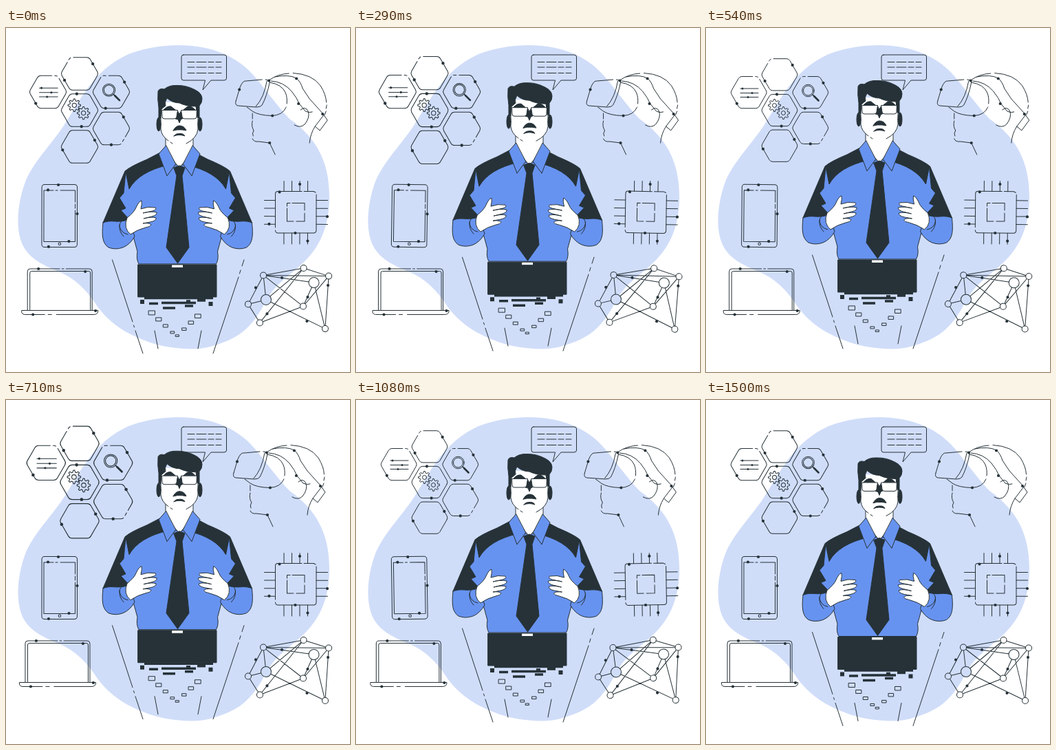
These frames come from a looping animation (500x500 px, 1.54 s). An HTML page:

```html
<!DOCTYPE html>
<html lang="en">
<head>
<meta charset="utf-8">
<style>
  html, body { margin: 0; height: 100%; overflow: hidden; background: #fff; }
  svg { display: block; width: 100vw; height: 100vh; }
  .line { fill: none; stroke: #263238; stroke-width: 1; stroke-linecap: round; stroke-linejoin: round; }
  .dark { fill: #263238; }
  .blue { fill: #6793f0; }
  .pale { fill: #d0ddf9; }
  .white { fill: #fff; }
  .dot { stroke-width: 4.2; }
  .bar { stroke-width: 3.5; stroke-linecap: butt; }
</style>
</head>
<body>
<svg viewBox="0 0 500 500">
  <path class="pale" d="M178 38C205 28 230 25 250 25C300 25 337 42 361 70C378 90 393 112 412 132C452 160 470 195 470 246C470 285 458 318 430 343C410 362 390 372 375 402C356 438 335 452 304 461C284 468 262 468 232 463C190 454 155 435 133 405C122 388 108 370 85 358C62 347 36 340 24 315C13 290 17 252 29 221C43 190 70 165 87 137C108 105 126 62 178 38Z"/>

  <g class="line">
    <path d="M258 39H317Q320.500 39 320.500 42V73Q320.500 76 317 76H298L286 90L289.500 76H258Q255 76 255 73V42Q255 39 258 39Z"/>
    <path d="M264 49.500H313M264 57H313M264 65.500H313" stroke-dasharray="10 3 14 3 8 3"/>
  </g>

  <g id="hexes" class="line">
    <path d="M50 88H76M50 94.500H76M50 100.500H76"/>
    <path d="M53 88h0M67 94.500h0M61 100.500h0" stroke-width="3"/>
    <circle cx="148.500" cy="91" r="8.800"/><circle cx="148.500" cy="91" r="7"/>
    <path d="M155 97l2 2" stroke-width="1.500"/><path d="M157 99l6.500 6.500" stroke-width="2.600"/>
  </g>

  <g id="headset" class="line">
    <path d="M334 106L340 86Q344 76 349 77L372 75M377 75Q382 75 383 79Q379 99 372 112Q370 115 364 115L337 113Q332 112 334 106M379 77Q375 101 363 114"/>
    <path d="M383 79Q401 82 406 94Q409 101 408 110M407 115Q402 127 386 127.500Q367 127 358 121L350 115"/>
    <path d="M382 76Q394 67 411 66M417 65.500Q445 67 457 84Q465 97 465.500 108M466 112L465 117M465 121L463 126"/>
    <path d="M385 77Q403 78 415 92Q423 102 426 110L435 121Q441 124 445 122M391 71Q411 67 422 73Q428 78 431 88L441 103L460 124L467 134L456 149L449 143L462 126"/>
    <path d="M428 119Q435 113 439 121Q442 130 434 140Q428 146 419 141M449 143Q442 154 441 167"/>
    <path d="M358 124V132M358 135Q356 143 360 149Q357 153 359 157M358 161Q360 166 367 165L383 167L391 184"/>
    <path class="dot" d="M339 89.500h0M382 76.500h0M422 73.500h0M425 110h0M387 127.500h0M460 125h0M383 167h0"/>
  </g>

  <g id="tablet" class="line">
    <rect x="52" y="227.500" width="51.500" height="91" rx="4"/>
    <path d="M55 310.500V236H69M72 236h3M79 236H100.500V253M100.500 256v6M100.500 265V310.500H55"/>
    <circle cx="78" cy="313.800" r="1.800"/>
    <path class="dot" d="M76 228h0M61 235.500h0M103.500 270h0M91.500 310h0M62 318h0"/>
  </g>

  <g id="chip" class="line">
    <path d="M430 237.500H395Q391.500 237.500 391.500 241V290M391.500 294Q392 298 395 298H447Q451 298 451 294V242M450 239L447 237.500H433"/>
    <path d="M416 254.500H434V265M434 269V281H422M418 281H408.500V262M408.500 259V254.500H413"/>
    <path class="dot" d="M397.500 238.500h0M427 227h0M467 274h0M382.500 285h0M420.500 298h0M438.500 309.500h0"/>
  </g>

  <g id="laptop" class="line">
    <path d="M31 410V354Q31 350 35 350H78M81 350h3M87 350H121Q125 350 125 354V410"/>
    <path d="M34.500 409.500V356Q34.500 353.500 37 353.500H120Q122.500 353.500 122.500 356V409.500"/>
    <path d="M56 416.500H27Q22.500 416 22.500 412V410.500H133.500V412Q133 416 128 416.500H73M61 416.500h5"/>
    <path class="dot" d="M47 350h0M115 354h0M130 411h0M39 416.500h0"/>
  </g>

  <g id="network" class="line"></g>

  <g id="person" class="line">
    <path d="M154.500 337L184 427M185.500 432l1 3M188 440L199 473M346 337L343 346M341 352L339.500 357M338 362L301 473M216 440L221 466M284 440L279 466"/>
    <path class="bar" d="M201 392.500H301M208 400.500h13m5-1h50M228 407h18M260 404h12m6-8h12M262 397h6"/>
    <path class="bar" d="M195 398h6M294.500 401h6" style="stroke-width:6"/>
    <path id="bits"/>

    <g id="half">
      <path class="dark" d="M250 215L228 179L205 191Q181 201 173 208L141 283L190 290H250Z"/>
      <path class="blue" d="M250 343H193Q189 336 191 325L178 277L167 265L174 262L165 247L171 240L174 209L179 234Q193 209 236 199H250"/>
    </g>
    <use href="#half" transform="matrix(-1 0 0 1 498.500 0)"/>
    <path class="white" d="M232 160V180L252 203L272 180V160Z"/>
    <path class="dark" d="M192 344H306V391H192Z"/>
    <path class="white" d="M241 344H257.500V348.500H241Z"/>
    <path class="dark" d="M244 203L252 200L260 203L256 215L266 319L249.500 342L233 319L248 215Z"/>

    <g id="arm">
      <path class="blue" d="M141 283C139 302 140 313 149 319Q159 323 170 319Q180 315 187 303L179 278Q170 282 158 281Q148 280 141 283Z"/>
      <path d="M176 277Q165 279 165 288Q167 298 177 300M165 286Q164 296 171 303"/>
      <path class="white" d="M176 276Q187 267 189 261Q193 252 197 251Q198 255 196 263Q206 259 217 261Q220 264 213 266L199 269Q211 266 219 268Q220 272 212 274L200 277Q212 274 218 276Q219 280 210 282L199 284Q209 283 211 286Q210 289 203 290Q191 293 181 300Q170 291 176 276Z"/>
    </g>
    <use href="#arm" transform="matrix(-1 0 0 1 498.500 0)"/>

    <path class="white" stroke="none" d="M225 108H279V147Q278 158 266 166L252 169L238 165Q226 158 225 147Z"/>
    <path d="M225 130V147Q226 157 236 164M239 166L242 168M262 168Q278 160 279 147V130"/>
    <path class="dark" d="M222 131V116Q220 104 221 92Q223 87 230 89Q237 83 248 83.500Q262 83 275 90Q285 95 285 103Q285 109 281 113L281 131L278 130L276 114Q262 114 252 109Q242 109 234 102Q230 108 232 113L226 118L225 131Z"/>
    <path class="dark" d="M249 120L246 132L250 133L252 138L254 133L258 131L255 120L252 125Z"/>
    <g id="side">
      <path class="blue" d="M232.500 171L222 183L234 215L246.500 198Z"/>
      <ellipse class="dark" cx="222" cy="140" rx="3" ry="10"/>
      <path class="dark" d="M229 119Q234 113 240 114L246 119Z"/>
      <path class="white" d="M227 119.500H249.500L248 129Q248 132 244 132H230Q227 132 227 129Z"/>
    </g>
    <use href="#side" transform="matrix(-1 0 0 1 504 0)"/>
    <path class="dark" d="M243 149Q247 142 252 142Q259 142 262 149L256 148H249ZM244 157Q247 153 252 153.500Q258 153 260 157Q252 154 244 157Z"/>
  </g>
</svg>

<script>
const LOOP = 1540, LEAD = 40;
const el = id => document.getElementById(id);
const add = (id, html) => el(id).insertAdjacentHTML('beforeend', html);
const polar = (x, y, r, a) => [x + r * Math.cos(a), y + r * Math.sin(a)];
const RAD = Math.PI / 180;

// Rounded hexagon whose sides each count 10 units; the gap and the dots sit at such units.
function hexagon(x, y, gap, ...dots) {
  const corner = i => polar(x, y, 26.7, i * 60 * RAD);
  const at = u => {
    const i = Math.floor(u / 10), k = u / 10 - i, [a, b] = [corner(i), corner(i + 1)];
    return [a[0] + (b[0] - a[0]) * k, a[1] + (b[1] - a[1]) * k];
  };
  let d = `M${at(1.2)}`;
  for (let i = 1; i <= 6; i++) d += `L${at(i * 10 - 1.2)}Q${corner(i)} ${at(i * 10 + 1.2)}`;
  add('hexes', `<path d="${d}Z" pathLength="60" stroke-dasharray="${gap} 1.5 1.5 1.5 60"/>
    <path class="dot" d="${dots.map(u => `M${at(u)}h0`).join('')}"/>`);
}

function gear(x, y) {
  const rim = Array.from({ length: 32 }, (_, i) => polar(x, y, i % 4 < 2 ? 9 : 6.4, (i - .5) * Math.PI / 16));
  add('hexes', `<path d="M${rim.join('L')}Z"/><circle cx="${x}" cy="${y}" r="3"/>`);
}

// Honeycomb: one cell in the middle, five of its six neighbours around it.
hexagon(107, 119.5, 60, 14, 43.5);
[[46, 23], [36, 26, 54], [38, 18, 54], [4, 15, 53], [60, 28, 56]].forEach((marks, i) =>
  hexagon(...polar(107, 119.5, 51.7, (i * 60 - 150) * RAD), ...marks));
gear(99.5, 112.5);
gear(112.5, 123.5);

for (let i = 0; i < 4; i++) {
  const x = 404 + i * 11.5, y = 250.5 + i * 11.6;
  add('chip', `<path d="M${x} 222.500V237.500M${x} 298V314M375.500 ${y}H391.500M451 ${y}H467.500"/>`);
}

const nodes = {
  A: [374, 359.5], B: [432.5, 349], C: [469, 360.5], D: [447.5, 370], E: [378, 395],
  F: [352, 401.5], G: [432, 404.5], H: [369, 428.5], I: [464, 437]
};
const links = 'AB AC AD AG AF AE BE BH BC DG DI CI CG EI FH FE HG'.split(' ');
add('network', `<path d="${links.map(([a, b]) => `M${nodes[a]}L${nodes[b]}`).join('')}"/>`);
for (const [name, [x, y]] of Object.entries(nodes)) {
  const fill = x < 380 && y < 410 ? 'pale' : 'white';
  add('network', `<circle class="${fill}" cx="${x}" cy="${y}" r="${'DE'.includes(name) ? 7.5 : 4.5}"/>`);
}
add('network', '<path class="dot" d="M401 363h0M363 377.500h0M438.500 391h0M468 374h0M379.500 415.500h0M437.500 426h0"/>');

// Small boxes zigzag towards the centre as they fall.
let bits = '';
for (let i = 0; i < 8; i++) {
  const w = 9 - i * .6, h = 6 - i * .5;
  const x = 248 + (i % 2 ? 1 : -1) * (36 - 5 * i) - w / 2;
  bits += `M${x} ${411 + 5 * i}h${w}v${h}h${-w}z`;
}
el('bits').setAttribute('d', bits);

// Linear interpolation through alternating position, value pairs.
function track(p, ...keys) {
  let i = 0;
  while (p > keys[i + 2]) i += 2;
  const [p0, v0, p1, v1] = keys.slice(i, i + 4);
  return v0 + (v1 - v0) * (p - p0) / (p1 - p0);
}
const move = (id, transform) => el(id).setAttribute('transform', transform);

function draw(now) {
  const p = (now + LEAD) % LOOP / LOOP;
  const lift = track(p, 0, .5, .5, -9.5, 1, .5);
  const beat = track(p, 0, 1, .1, 1.1, .3, 1, .4, 1, .5, 1.1, .6, 1, 1, 1);
  const tilt = track(p, 0, 0, .25, 1, .75, -1, 1, 0);
  const slide = track(p, 0, 0, .4, 2.9, .48, -3.1, 1, 0);

  move('person', `translate(0 ${lift})`);
  move('hexes', `translate(107 119.500) scale(${beat}) translate(-107 -119.500)`);
  move('tablet', `rotate(${tilt} 78 273)`);
  move('chip', `rotate(${tilt} 421 268)`);
  move('network', `rotate(${tilt} 411 393)`);
  move('laptop', `translate(${slide} 0)`);
  move('headset', `translate(${slide} 0)`);
}

const start = performance.now();
(function frame() {
  draw(performance.now() - start);
  requestAnimationFrame(frame);
})();
</script>
</body>
</html>
```
